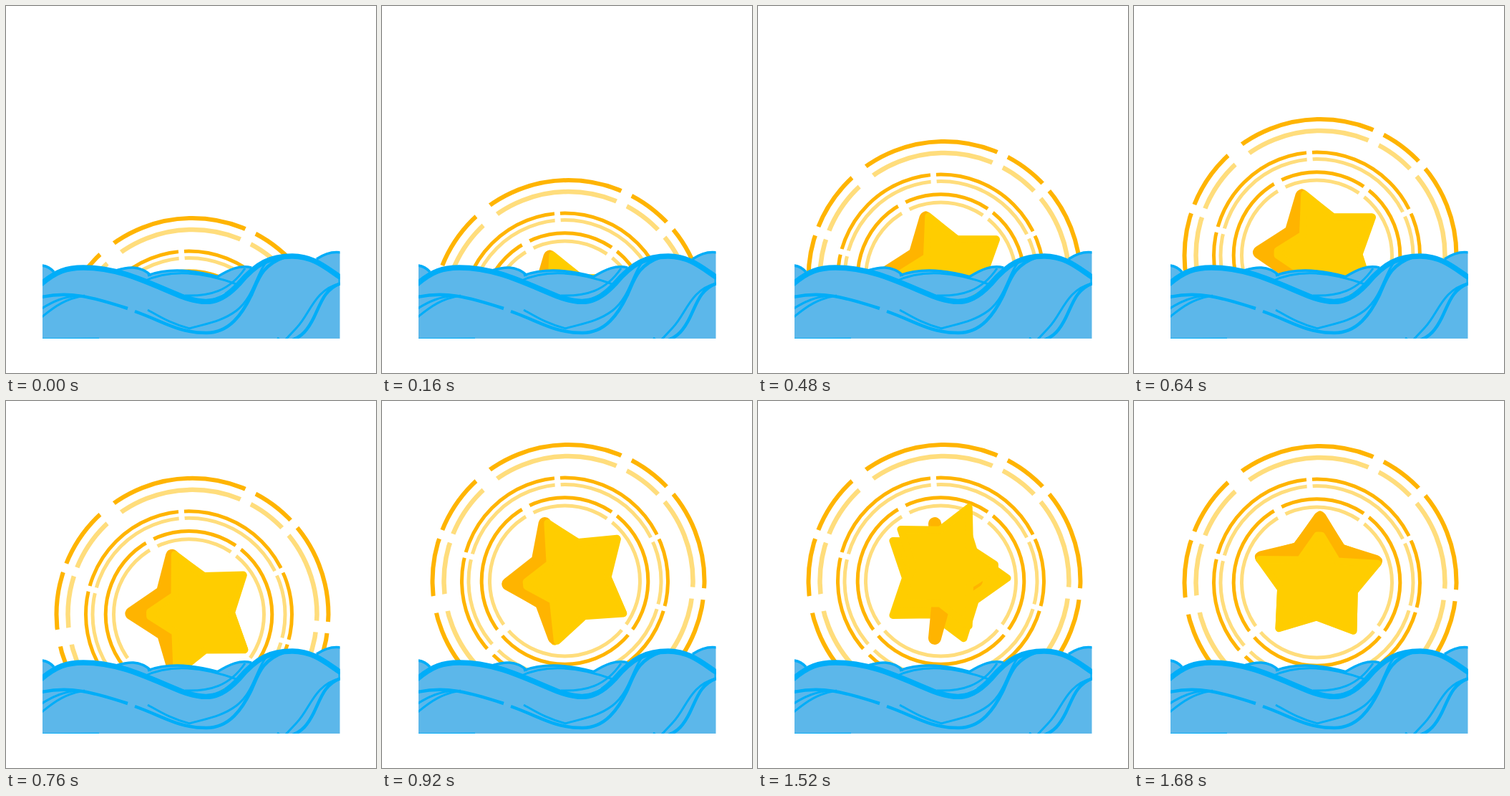
Animation of 517x512 px, one loop 2480 ms. Source, as an HTML page:

```html
<!DOCTYPE html>
<html lang="en">
<head>
<meta charset="utf-8">
<title>Star rising over the sea</title>
<style>
html, body { margin: 0; width: 100%; height: 100%; overflow: hidden; background: #fff; }
svg { display: block; width: 517px; height: 512px; }
.line { fill: none; stroke: #00adf8; }
.water { fill: #5cb7ea; }
.face { fill: #ffcd00; stroke: #ffcd00; stroke-width: 10; }
.shade { fill: #ffb400; stroke: #ffb400; stroke-width: 18; }
.soft { fill: #ffb900; stroke: #ffb900; stroke-width: 10; }
#star path { stroke-linejoin: round; }
</style>
</head>
<body>
<svg viewBox="0 0 517 512">
  <defs>
    <clipPath id="sky"><path d="M0 0H517V410H0Z"/></clipPath>
    <clipPath id="sea"><path d="M51 330H466.5V464H51Z"/></clipPath>
  </defs>
  <g clip-path="url(#sky)">
    <g id="rings"></g>
    <g id="star">
      <g id="base"><path class="face"/><path id="tip" class="soft"/></g>
      <g id="crescent"><path class="shade"/></g>
      <g id="front"><path class="face"/></g>
    </g>
  </g>
  <g clip-path="url(#sea)">
    <g class="water">
      <path d="M51 361Q60 362 67 371L51 390Z"/>
      <path d="M150 368C168 364 186 360 204 376L200 400H150Z"/>
      <path d="M190 381C215 368 252 364 297 378L325 388L280 416H220Z"/>
      <path d="M294 378C313 367 327 360 344 365V400H294Z"/>
      <path d="M434 353C446 345 456 342 468 344V390H434Z"/>
    </g>
    <g class="line" stroke-width="3.5">
      <path d="M50 362Q60 363 67 371"/>
      <path d="M154 369C170 364 186 361 203 376"/>
      <path d="M198 376C222 367 254 366 297 378"/>
      <path d="M295 378C313 367 327 361 343 365"/>
      <path d="M434 353C446 345 456 342 468 344"/>
    </g>
    <path class="water" d="M51 386C70 370 85 365 108 365C160 365 200 387 245 405C280 418 300 415 325 388C350 358 370 349 400 349C430 349 448 366 468 379V466H51Z"/>
    <g class="line" stroke-width="3">
      <path d="M193 384C222 370 264 367 322 388"/>
      <path d="M250 404C285 405 312 398 334 366"/>
      <path d="M364 357C350 373 346 407 322 425C302 440 280 443 256 450"/>
      <path d="M50 434C68 419 84 408 110 404"/>
      <path d="M50 422C66 412 80 406 100 404"/>
      <path d="M198 424C216 434 232 444 257 450"/>
      <path d="M467 387C430 396 425 430 406 449L391 465"/>
      <path d="M379 463L383 466"/>
    </g>
    <g class="line" stroke-width="4.5">
      <path d="M50 406C88 398 118 405 170 422"/>
      <path d="M180 426C220 440 240 456 280 456C312 456 330 430 343 403C353 380 358 361 390 350"/>
      <path d="M467 387C444 396 440 415 430 435C421 453 413 461 400 466"/>
    </g>
    <path class="line" stroke-width="7.5" d="M49 388C70 370 85 365 108 365C160 365 200 387 245 405C280 418 300 415 325 388C350 358 370 349 400 349C430 349 448 366 468 379"/>
    <path class="line" stroke-width="1.5" d="M51 464L130 463.5"/>
    <path class="line" stroke-width="3" d="M466 374V390"/>
  </g>
</svg>
<script>
const STEP = 40, LAST = 1680, LOOP = 2480;
const $ = id => document.getElementById(id);
const polar = (r, deg) => [r * Math.cos(deg * Math.PI / 180), r * Math.sin(deg * Math.PI / 180)];
const pt = (r, deg) => polar(r, deg).map(v => v.toFixed(2)).join(" ");
const poly = list => "M" + list.map(([r, a]) => pt(r, a)).join("L") + "Z";

// Each band: centre x, two circles [radius, width], bar span, gaps [angle, width].
const bands = [
  { x: 260.5, dark: [190, 6], pale: [174, 6.5], span: [165, 200],
    gaps: [[-129, 25], [-64.7, 16], [-41.7, 14], [5.5, 16], [-160, 13], [170, 24]] },
  { x: 255.5, dark: [144, 5], pale: [134.5, 5], span: [129, 150],
    gaps: [[-94.2, 8], [-165.5, 8], [-25.3, 7], [15.5, 7], [136.5, 12]] },
  { x: 255.5, dark: [116.3, 5], pale: [105, 5], span: [98, 122],
    gaps: [[-118, 12], [-53.5, 9], [38, 10], [141.5, 11]] }
];
const circle = ([r, w], color) =>
  `<circle r="${r}" fill="none" stroke="${color}" stroke-width="${w}"/>`;
$("rings").innerHTML = bands.map(b =>
  `<g transform="translate(${b.x})">` + circle(b.pale, "#ffdd7c") + circle(b.dark, "#ffb400") +
  b.gaps.map(([a, w]) =>
    `<path d="M${pt(b.span[0], a)}L${pt(b.span[1], a)}" stroke="#fff" stroke-width="${w}"/>`).join("") +
  "</g>").join("");

// Star parts, all with the shaded tip along angle 0.
const full = Array.from({ length: 10 }, (_, i) => [i % 2 ? 54 : 88.5, i * 36]);
$("base").firstElementChild.setAttribute("d", poly(full));
$("tip").setAttribute("d", poly([[88.5, 0], [54, 36], [30, 30], [30, -30], [54, -36]]));
$("crescent").firstElementChild.setAttribute("d", poly([
  [84, 72], [49.5, 36], [84, 0], [49.5, -36], [84, -72], [46, -49], [46, 49]]));
$("front").firstElementChild.setAttribute("d", poly([
  [60, -3], [60, 3], [36, 46], [86, 74], [54, 108], [88.5, 144], [54, 180],
  [88.5, 216], [54, 252], [86, 286], [36, 314]]));

// Smooth curve through [time, value] keys without overshoot.
function curve(keys, t) {
  const n = keys.length - 1;
  if (t <= keys[0][0]) return keys[0][1];
  if (t >= keys[n][0]) return keys[n][1];
  const slope = i => (keys[i + 1][1] - keys[i][1]) / (keys[i + 1][0] - keys[i][0]);
  const tangent = i => {
    if (i === 0) return slope(0);
    if (i === n) return slope(n - 1);
    const a = slope(i - 1), b = slope(i);
    return a * b > 0 ? 2 * a * b / (a + b) : 0;
  };
  let i = 0;
  while (t > keys[i + 1][0]) i++;
  const h = keys[i + 1][0] - keys[i][0], u = (t - keys[i][0]) / h, v = 1 - u;
  return v * v * (1 + 2 * u) * keys[i][1] + u * u * (3 - 2 * u) * keys[i + 1][1] +
    h * u * v * (v * tangent(i) - u * tangent(i + 1));
}

const rise = [[0, 486], [320, 392.5], [560, 371], [640, 348], [920, 251], [1200, 249.5], [1520, 251], [1680, 253]];
const spin = [[640, 181], [920, 175.3], [1200, 122.6], [1520, 0], [1680, -88]];
const times = [640, 920, 1200, 1520, 1680];
const track = values => times.map((t, i) => [t, values[i]]);
// Layer centres relative to the rings' centre (260.5, rise).
const layers = {
  base: [track([-0.5, 0.8, 0.5, -0.5, -3.5]), track([-3, -1.5, -2.5, -4, -6])],
  crescent: [track([-1.5, -0.5, 6.5, -39.5, -3.5]), track([-3, -2.5, -11, 0, -6])],
  front: [track([0, 1.2, 4, 10.5, -3.5]), track([-2.5, -0.5, -5, -20, -5.5])]
};

function draw(time) {
  const t = Math.min(Math.floor(time % LOOP / STEP) * STEP, LAST);
  const y = curve(rise, t), angle = curve(spin, t);
  $("rings").setAttribute("transform", `translate(0 ${y})`);
  for (const id in layers) {
    const [dx, dy] = layers[id].map(keys => curve(keys, t));
    $(id).setAttribute("transform", `translate(${260.5 + dx} ${y + dy}) rotate(${angle})`);
  }
  $("tip").setAttribute("opacity", t < 1360 || t === LAST ? 1 : 0);
}

let start;
function tick(now) {
  if (start === undefined) start = now;
  draw(now - start);
  requestAnimationFrame(tick);
}
draw(0);
requestAnimationFrame(tick);
</script>
</body>
</html>
```
